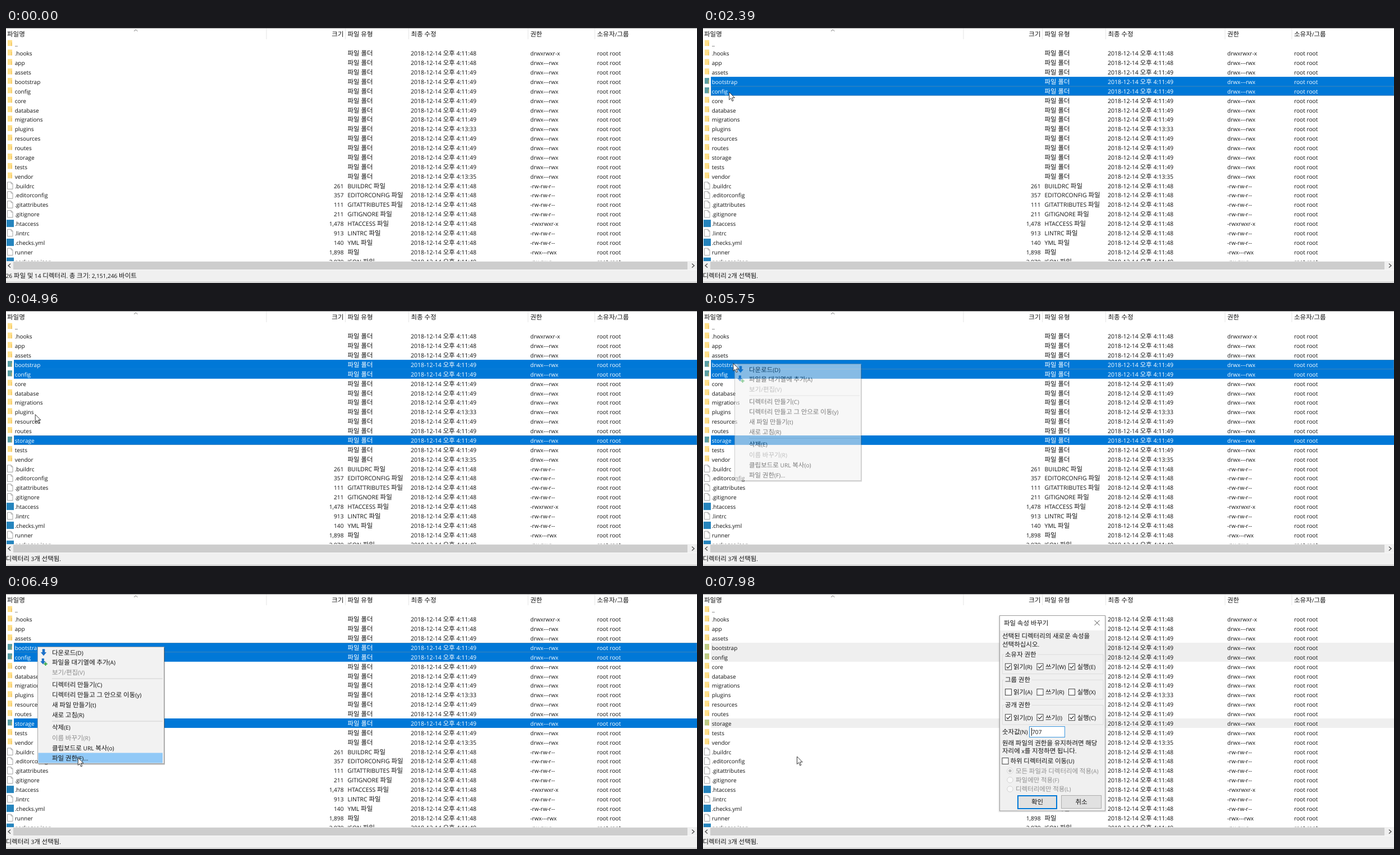
These frames come from a looping animation (1231 px wide and 455 px high, 8000 ms). An HTML page:

```html
<!DOCTYPE html>
<html lang="ko">
<head>
<meta charset="utf-8">
<style>
html, body { margin: 0; width: 100%; height: 100%; overflow: hidden; background: #fff; }
svg { display: block; }
text { font: 10.2px 'Open Sans', 'Noto Sans', sans-serif; text-rendering: geometricPrecision; white-space: pre; }
.name, .perm { font-size: 10px; }
.kind, .date { font-size: 10.5px; }
.ko { font: 11.5px 'Noto Sans CJK KR', 'Noto Sans CJK', sans-serif; }
</style>
</head>
<body>
<svg id="stage" width="1231" height="455" viewBox="0 0 1231 455" fill="#111"></svg>
<script>
const LOOP = 8000, TOP = 19.6, PITCH = 16.87;
const BLUE = '#0078d7', FACE = '#f0f0f0', YELLOW = '#ffe08c';

// ---- drawing helpers (all return SVG markup) ----
const rect = (x, y, w, h, fill, more = '') =>
  `<rect x="${x}" y="${y}" width="${w}" height="${h}" fill="${fill}" ${more}/>`;
const path = (d, stroke, width = 1, fill = 'none') =>
  `<path d="${d}" stroke="${stroke}" stroke-width="${width}" fill="${fill}"/>`;
// Text centred vertically on cy; Hangul runs get their own font size.
const text = (x, cy, s, more = '') =>
  `<text x="${x}" y="${cy + 3.7}" ${more}>` +
  s.replace(/[가-힣]+/g, '<tspan class="ko">$&</tspan>') + '</text>';

// ---- file list ----
const folders = '.. .hooks app assets bootstrap config core database migrations plugins resources routes storage tests vendor'.split(' ');
const files = [
  ['.buildrc', '261', 'BUILDRC '], ['.editorconfig', '357', 'EDITORCONFIG '],
  ['.gitattributes', '111', 'GITATTRIBUTES '], ['.gitignore', '211', 'GITIGNORE '],
  ['.htaccess', '1,478', 'HTACCESS '], ['.lintrc', '913', 'LINTRC '],
  ['.checks.yml', '140', 'YML '], ['runner', '1,898', ''], ['packages.json', '3,879', 'JSON ']
];
const clock = { '.hooks': '11:48', app: '11:48', plugins: '13:33', vendor: '13:35', 'packages.json': '11:49' };
const perms = { '.hooks': 'drwxrwxr-x', '.htaccess': '-rwxrwxr-x', runner: '-rwx---rwx' };
const square = /htaccess|yml|json/;

function icon(name, isFile, y) {
  if (!isFile) {
    return rect(3, y + 2, 8, 10.5, YELLOW, 'class="folder"') +
      rect(9, y + 6, 2, 6.5, '#e8b64c', 'opacity=".45"');
  }
  if (square.test(name)) return rect(1, y + 2, 13, 13, '#2584bd');
  return path(`M2.5 ${y + 2.3}h6.5l3 3v9.5h-9.5zM9 ${y + 2.3}v3h3`, '#999', .9, '#fff');
}

function row(name, i, size, kind, isFile) {
  const y = TOP + i * PITCH, cy = y + 9.2;
  let s = `<g class="row">` + rect(14, y, 1217, PITCH, 'none', 'class="bar"') +
    icon(name, isFile, y) + text(15.7, cy, name, 'class="name"');
  if (i) {
    const time = clock[name] || (isFile ? '11:48' : '11:49');
    s += text(601.5, cy, size, 'text-anchor="end"') +
      text(608.5, cy, kind, 'class="kind"') +
      text(721, cy, `2018-12-14 오후 4:${time}`, 'class="date"') +
      text(934, cy, perms[name] || (isFile ? '-rw-rw-r--' : 'drwx---rwx'), 'class="perm"') +
      text(1053, cy, 'root root');
  }
  return s + '</g>';
}

function list() {
  const rows = folders.map((n, i) => row(n, i, '', '파일 폴더', false)).join('') +
    files.map(([n, size, ext], i) => row(n, i + folders.length, size, ext + '파일', true)).join('');
  const heads = [[2, '파일명'], [608.5, '파일 유형'], [721.5, '최종 수정'], [934, '권한'], [1053, '소유자/그룹']];
  return `<clipPath id="view"><rect width="1231" height="416"/></clipPath><g clip-path="url(#view)">` + rows +
    rect(14.5, 0, 1216, PITCH - .6, 'none', 'id="focus" stroke="#e09a5a" stroke-opacity=".6" stroke-width=".8" stroke-dasharray="1 1"') + '</g>' +
    heads.map(([x, s]) => text(x, 10.8, s)).join('') + text(601.5, 10.8, '크기', 'text-anchor="end"') +
    [464, 604.5, 717.5, 930, 1049].map(x => rect(x - .5, 1, 1, 19, '#e5e5e5')).join('') +
    path('M228 5.7l3.2-2.7 3.2 2.7', '#666', .9) + rect(0, 0, 1231, 1, '#9a9a9a') +
    rect(0, 416, 1231, 39, FACE) + rect(13, 417, 1201, 14, '#cdcdcd') +
    path('M8 420.5l-4 3.5 4 3.5M1222 420.5l4 3.5-4 3.5', '#505050', 1.4) +
    rect(0, 431, 1231, 1, '#fafafa') + rect(0, 453, 1231, 1, '#b4b4b4') +
    '<g id="status"></g>';
}

// ---- context menu: centre, label, disabled ----
const items = [
  [105, '다운로드(D)'], [122.7, '파일을 대기열에 추가(A)'], [140.5, '보기/편집(V)', 1],
  [162.3, '디렉터리 만들기(C)'], [180.5, '디렉터리 만들고 그 안으로 이동(y)'],
  [198.5, '새 파일 만들기(t)'], [216.5, '새로 고침(R)'], [238.7, '삭제(E)'],
  [256.8, '이름 바꾸기(R)', 1], [274.8, '클립보드로 URL 복사(o)'], [292.8, '파일 권한(F)...']
];
const menuItem = ([cy, s, off]) => text(82, cy, s, off ? 'fill="#8a8a8a"' : '');
const hoverBar = (more = '') => rect(57.5, 283.5, 221.5, 18, '#91c9f7', more);

function menu() {
  const arrow = (x, y, k) =>
    `<path transform="translate(${x} ${y}) scale(${k})" d="M-2.4 -6h4.8v6h3l-5.4 6.5 -5.4-6.5h3z" fill="#1d71c8"/>`;
  return '<g id="menu">' + rect(58, 96, 225, 208.5, '#000', 'opacity=".3"') +
    rect(56.5, 94.5, 225, 208, '#f2f2f2', 'stroke="#a8a8a8"') + hoverBar('id="hover"') +
    rect(82, 150.5, 197, 1, '#d2d2d2') + rect(82, 226.5, 197, 1, '#d2d2d2') +
    arrow(67, 104, .95) + arrow(65.8, 120, .85) + path('M70.5 121.5v6.4M67.3 124.7h6.4', '#37a84a', 2) +
    items.map(menuItem).join('') + '</g>' +
    '<g id="chosen">' + hoverBar() + menuItem(items[10]) + '</g>';
}

// ---- permissions dialog ----
const check = (x, cy, on) => rect(x + .5, cy - 5.5, 11, 11, '#fff', 'stroke="#444"') +
  (on ? path(`M${x + 2.7} ${cy}l2.3 2.6 4.6-5.2`, '#222', 1.2) : '');

function group(cy, title, keys, on) {
  const w = 538 + title.length * 10.6 - 5;
  return path(`M536 ${cy}h-2.5v34.5h179.5v-34.5H${w}`, '#dcdcdc') + text(538, cy, title) +
    ['읽기', '쓰기', '실행'].map((s, i) =>
      check([538, 594.5, 651][i], cy + 21.7, on) +
      text([553, 610, 666.5][i], cy + 22.3, `${s}(${keys[i]})`)).join('');
}

function dialog() {
  const radio = (cy, s, on) => `<circle cx="547" cy="${cy}" r="5.2" fill="#f8f8f8" stroke="#d0d0d0" stroke-width=".9"/>` +
    (on ? `<circle cx="547" cy="${cy}" r="2.7" fill="#bcbcbc"/>` : '') + text(557, cy + .5, s, 'fill="#8f8f8f"');
  const button = (x, y, w, h, s, border, width) =>
    rect(x, y, w, h, '#e1e1e1', `stroke="${border}" stroke-width="${width}"`) +
    text(x + w / 2, 371.3, s, 'text-anchor="middle"');
  return '<g id="dialog">' +
    [1, 2, 3].map(d => rect(528.5 - d, 40 - d / 2, 188 + 2 * d, 347 + 1.5 * d, '#000', 'opacity=".04" rx="2"')).join('') +
    rect(528.5, 38.5, 188, 348.5, FACE, 'stroke="#9a9a9a"') + rect(529, 39, 187, 26, '#fff') +
    text(536, 52, '파일 속성 바꾸기') + path('M697.5 47l9 9M706.5 47l-9 9', '#333', .9) +
    text(533, 75.5, '선택된 디렉터리의 새로운 속성을') + text(533, 90, '선택하십시오.') +
    group(108, '소유자 권한', 'RWE', true) + group(153.3, '그룹 권한', 'ARX', false) +
    group(198.5, '공개 권한', 'DIC', true) +
    text(533, 246, '숫자값(N)') + rect(581.5, 236.5, 63, 19, '#fff', 'stroke="#3a96df"') +
    text(586, 246, '707') + rect(585, 239, 1, 14, '#111') +
    text(533, 266, '원래 파일의 권한을 유지하려면 해당') + text(533, 280.7, '자리에 x를 지정하면 됩니다.') +
    check(532.5, 298, false) + text(547.5, 298.7, '하위 디렉터리로 이동(U)') +
    radio(315.5, '모든 파일과 디렉터리에 적용(A)', true) + radio(331.8, '파일에만 적용(F)') +
    radio(348, '디렉터리에만 적용(L)') +
    button(561, 360, 69, 23, '확인', BLUE, 2) + button(638.5, 359.5, 71, 23, '취소', '#adadad', 1) + '</g>';
}

const stage = document.getElementById('stage');
stage.innerHTML = rect(0, 0, 1231, 455, '#fff') + list() + menu() + dialog() +
  '<circle id="press" r="10.4" fill="#fff000" opacity=".62"/>' +
  '<path id="cursor" d="M0 0V13.6L3 10.7 5.3 16 7.4 15.1 5.2 9.9H9.7Z" fill="#fff" stroke="#222" stroke-width=".9"/>';

const get = id => document.getElementById(id);
const [focus, status, menuBox, hover, chosen, dlg, press, cursor] =
  ['focus', 'status', 'menu', 'hover', 'chosen', 'dialog', 'press', 'cursor'].map(get);
const rowNodes = [...document.querySelectorAll('.row')].map(g =>
  ({ g, bar: g.querySelector('.bar'), folder: g.querySelector('.folder') }));

// ---- timeline ----
const clamp = p => Math.max(0, Math.min(1, p));
const ramp = (t, a, b) => clamp((t - a) / (b - a));
const smooth = p => p * p * (3 - 2 * p);
const easeOut = p => 1 - (1 - p) ** 2;

// start, end, target x, target y, easing
const moves = [
  [450, 1090, 46, 99, easeOut], [1500, 1800, 49.5, 114.5, smooth], [1970, 2030, 46.7, 114.5, smooth],
  [2640, 3430, 59, 210, smooth], [3450, 3840, 51.3, 228, smooth],
  [4650, 5470, 54, 93.5, smooth], [5790, 6490, 128.3, 292, smooth], [7750, 7980, 167.5, 290, easeOut]
];
const presses = [[1320, 1480], [2210, 2390], [3840, 3990], [5550, 5700], [7410, 7590]];
const picks = [[1480, 4], [2390, 5], [3990, 12]];
const focuses = [...picks, [5550, 4]];

function pointer(t) {
  let x = 400, y = 440;
  for (const [a, b, tx, ty, ease] of moves) {
    const p = ease(ramp(t, a, b));
    x += (tx - x) * p;
    y += (ty - y) * p;
  }
  return [x, y];
}

const show = (node, on) => node.setAttribute('visibility', on ? 'visible' : 'hidden');
let statusText;

function draw(t) {
  const inactive = t >= 7640;
  const picked = picks.filter(([at]) => t >= at).map(([, i]) => i);
  rowNodes.forEach(({ g, bar, folder }, i) => {
    const on = picked.includes(i);
    bar.setAttribute('fill', !on ? 'none' : inactive ? '#efefef' : BLUE);
    g.setAttribute('fill', on && !inactive ? '#fff' : '#111');
    if (folder) folder.setAttribute('fill', !on ? YELLOW : inactive ? '#bccb88' : '#5b9fa5');
  });

  const focused = focuses.filter(([at]) => t >= at).pop();
  show(focus, focused && !inactive);
  if (focused) focus.setAttribute('y', TOP + focused[1] * PITCH + .3);

  const s = picked.length ? `디렉터리 ${picked.length}개 선택됨.` : '26 파일 및 14 디렉터리. 총 크기: 2,151,246 바이트';
  if (s !== statusText) status.innerHTML = text(-.5, 442, statusText = s);

  const [x, y] = pointer(t);
  show(cursor, t >= 490);
  cursor.setAttribute('transform', `translate(${x} ${y})`);
  show(press, presses.some(([a, b]) => t >= a && t < b));
  press.setAttribute('cx', x);
  press.setAttribute('cy', y);

  show(menuBox, t >= 5700 && t < 7590);
  menuBox.setAttribute('opacity', ramp(t, 5690, 5800));
  const over = x > 57 && items.find(([cy]) => Math.abs(y - cy) < 9);
  show(hover, over && t >= 5700 && t < 7590);
  if (over) {
    hover.setAttribute('y', over[0] - 9.3);
    hover.setAttribute('fill', over[2] ? '#e0e0e0' : '#91c9f7');
  }
  show(chosen, t >= 7590);
  chosen.setAttribute('opacity', 1 - ramp(t, 7590, 7800));

  const open = easeOut(ramp(t, 7643, 7843)), k = .945 + .055 * open;
  show(dlg, open > 0);
  dlg.setAttribute('opacity', open);
  dlg.setAttribute('transform', `translate(622.5 213) scale(${k}) translate(-622.5 -213)`);
}

const start = performance.now();
function tick() {
  draw((performance.now() - start) % LOOP);
  requestAnimationFrame(tick);
}
tick();
</script>
</body>
</html>
```
